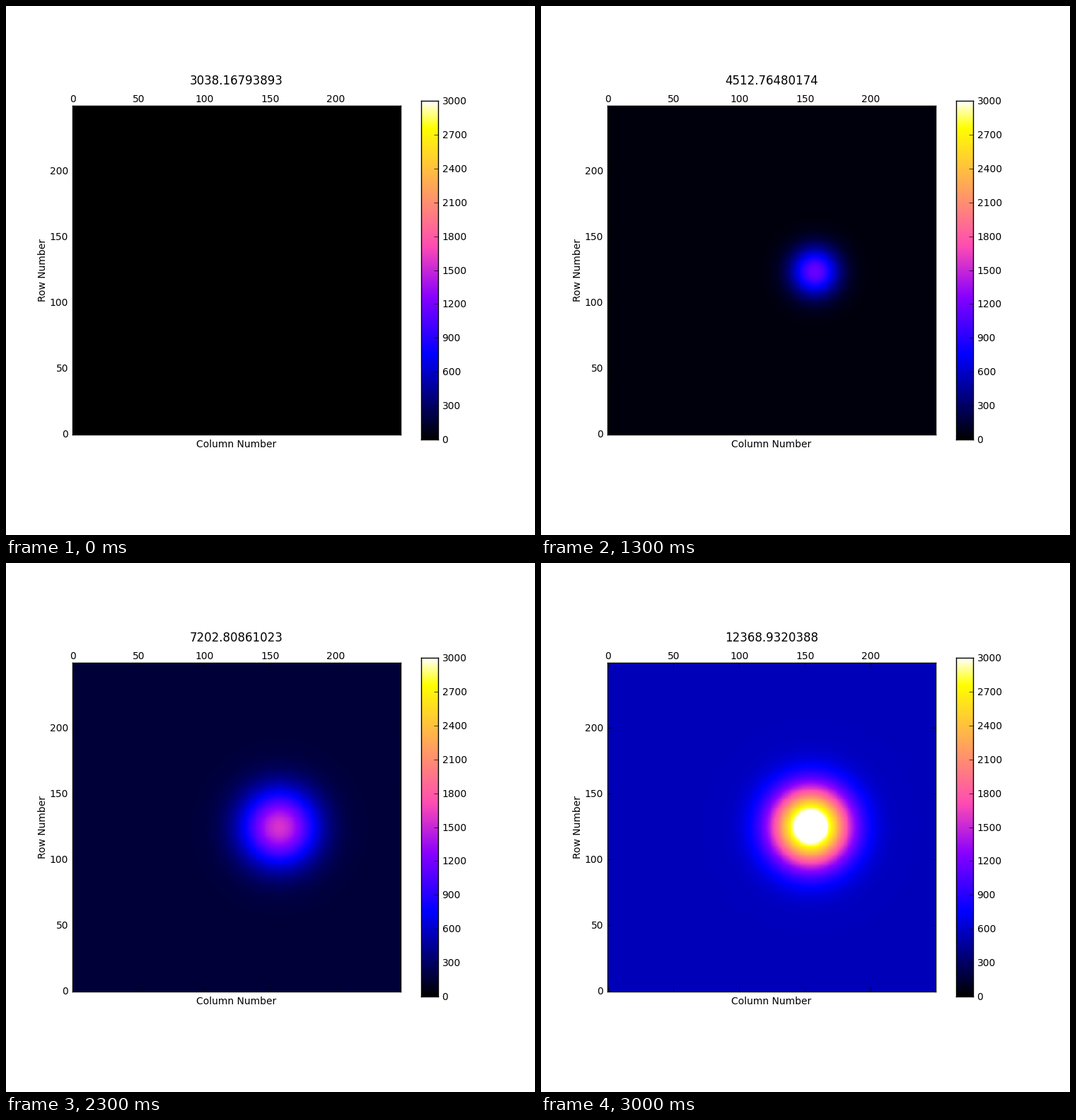
A matplotlib script for the animation above (3100 ms loop, 748 px wide and 748 px high).

```python
import numpy as np
import matplotlib.pyplot as plt
from matplotlib.animation import FuncAnimation

SIZE, DPI = 748, 100
CELLS, VMAX = 250, 3000
FRAMES, INTERVAL = 31, 100

plt.rcParams.update({"font.family": "DejaVu Sans", "font.size": 10,
                     "axes.linewidth": 1.0})

# Layout in pixels from the lower left corner; the page is a pixel larger
# than the stage, so its top row and right column are cut off
PAGE = SIZE + 1
SIDE = 0.62 * PAGE
LEFT, BOTTOM = 0.125 * PAGE, (PAGE - SIDE) / 2
TOP, CENTER = BOTTOM + SIDE, LEFT + SIDE / 2
BAR_H = 0.64 * PAGE
BAR_W = BAR_H / 20
BAR_LEFT, BAR_BOTTOM = 0.78375 * PAGE, (PAGE - BAR_H) / 2
POINT = DPI / 72
PAD = 4 * POINT
HALF_DIGIT = 5.06

# Channels are equally wide in 1 / wavelength, each labelled by its mean edge
edges = 1 / np.linspace(1 / 3000, 1 / 13000, FRAMES + 1)
waves = (edges[:-1] + edges[1:]) / 2

# Brightness at a few key channels
KEYS = [0, 9, 17, 23, 25, 27, 30]
SKY = [0, 9, 73, 171, 391, 656, 550]
PEAK = [0, 735, 1490, 1390, 2100, 3060, 2920]

cols, rows = np.meshgrid(np.arange(CELLS), np.arange(CELLS))


def rise(i, middle, width):
    return 1 / (1 + np.exp((middle - i) / width))


def channel(i):
    x = 157.2 - 3.2 * rise(i, 24.5, 0.8)
    y = 125.1 - 34 * (1000 / waves[i]) ** 2  # bluer light is refracted more
    sigma = 12.2 + 8.1 * rise(i, 18.5, 1.7)
    spot = np.exp(-((cols - x) ** 2 + (rows - y) ** 2) / (2 * sigma ** 2))
    return np.interp(i, KEYS, SKY) + np.interp(i, KEYS, PEAK) * spot


fig = plt.figure(figsize=(SIZE / DPI, SIZE / DPI), dpi=DPI, facecolor="white")


def add_axes(x, y, w, h):
    return fig.add_axes([x / SIZE, y / SIZE, w / SIZE, h / SIZE])


def label(x, y, text, **style):
    return fig.text(x / SIZE, y / SIZE, text, va="baseline", **style)


ax = add_axes(LEFT, BOTTOM, SIDE, SIDE)
image = ax.imshow(channel(0), cmap="gnuplot2", vmin=0, vmax=VMAX,
                  origin="lower", interpolation="nearest", aspect="auto")
marks = range(0, CELLS, 50)
ax.set_xticks(marks)
ax.set_yticks(marks)
ax.tick_params(direction="in", length=4, width=0.5, top=True, right=True,
               labelleft=False, labelbottom=False)
for m in marks:
    offset = (m + 0.5) * SIDE / CELLS
    label(LEFT + offset, TOP + PAD, str(m), ha="center")
    label(LEFT - PAD, BOTTOM + offset - HALF_DIGIT, str(m), ha="right")

bar = add_axes(BAR_LEFT, BAR_BOTTOM, BAR_W, BAR_H)
bar.imshow(np.arange(256)[:, None], cmap="gnuplot2", origin="lower",
           extent=(0, 1, 0, VMAX), interpolation="nearest", aspect="auto")
levels = range(0, VMAX + 1, 300)
bar.set_xticks([])
bar.set_yticks(levels)
bar.tick_params(direction="in", length=4, width=0.5, left=False, right=True,
                labelleft=False)
for v in levels:
    y = BAR_BOTTOM + BAR_H * v / VMAX
    label(BAR_LEFT + BAR_W + PAD, y - HALF_DIGIT, str(v), ha="left")

label(CENTER, 124, "Column Number", ha="center")
label(55.8, PAGE / 2, "Row Number", ha="center", rotation=90,
      rotation_mode="anchor")
title = label(CENTER, TOP + 0.05 * SIDE + 5 * POINT, "", ha="center",
              fontsize=12)


def update(i):
    image.set_data(channel(i))
    title.set_text(f"{waves[i]:.12g}")
    return image, title


anim = FuncAnimation(fig, update, frames=FRAMES, interval=INTERVAL,
                     repeat=True, repeat_delay=0)
plt.show()
```
